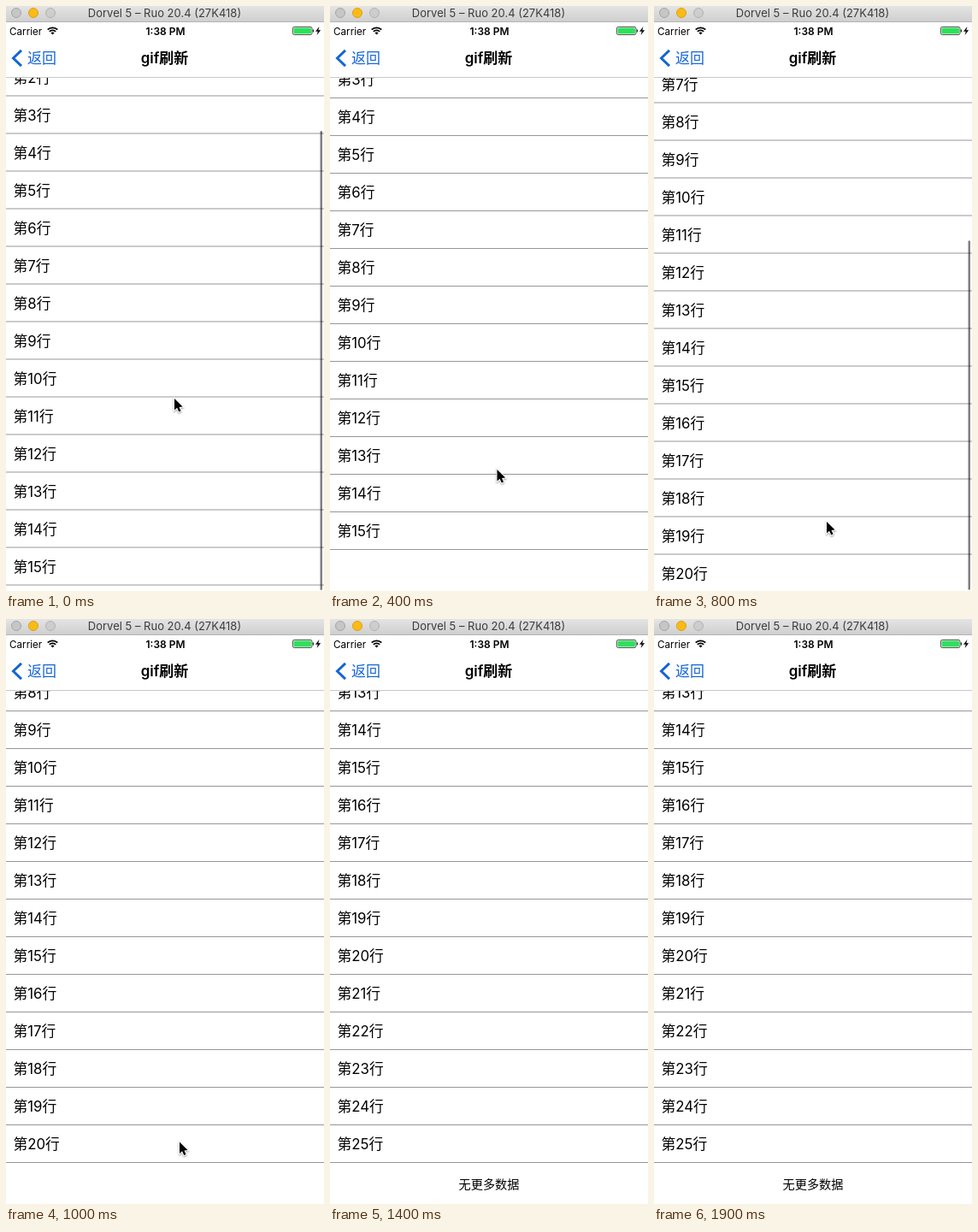
These frames come from a looping animation (372x684 px, 2000 ms). An HTML page with a canvas:

```html
<!DOCTYPE html>
<html lang="zh">
<head>
<meta charset="utf-8">
<title>List refresh</title>
<style>
html, body { margin: 0; width: 100%; height: 100%; overflow: hidden; background: #fff; }
canvas { display: block; }
</style>
</head>
<body>
<canvas id="stage" width="372" height="684"></canvas>
<script>
const W = 372, H = 684, LOOP = 2000, STEP = 100;
const TOP = 83, VIEW = H - TOP, ROW = 44;
const FONT = 'Inter, "Noto Sans CJK SC", "Noto Sans CJK", sans-serif';
const BLUE = '#1566d6';
const ctx = document.getElementById('stage').getContext('2d');

// Keys: time, then values
const scrollKeys = [[0, 66.5], [200, 58], [400, 108], [600, 108], [800, 278.5], [1000, 328], [1200, 328], [1400, 548]];
const pointerKeys = [[0, 197, 459], [200, 198, 547], [600, 193, 537], [800, 202, 603], [1200, 204, 620], [1400, 200, 560]];

function at(keys, t, col = 1) {
  const i = keys.findIndex(k => k[0] > t);
  if (i < 0) return keys[keys.length - 1][col];
  const a = keys[i - 1], b = keys[i];
  return a[col] + (b[col] - a[col]) * (t - a[0]) / (b[0] - a[0]);
}

function text(str, x, y, size, { weight = 400, color = '#000', align = 'left' } = {}) {
  ctx.font = `${weight} ${size}px ${FONT}`;
  ctx.fillStyle = color;
  ctx.textAlign = align;
  ctx.fillText(str, x, y);
}

function box(x, y, w, h, color) {
  ctx.fillStyle = color;
  ctx.fillRect(x, y, w, h);
}

function roundBox(x, y, w, h, r) {
  ctx.beginPath();
  ctx.roundRect(x, y, w, h, r);
}

function poly(points) {
  ctx.beginPath();
  points.forEach(([x, y]) => ctx.lineTo(x, y));
}

function drawList(scroll, rows, ended) {
  for (let n = 1; n <= rows; n++) {
    const y = TOP + ROW * n - scroll;
    if (y < TOP || y > H + ROW) continue;
    text(`第${n}行`, 8.5, y - 15, 16.8);
    box(0, y, W, 1, '#979797');
  }
  if (ended) text('无更多数据', 186, TOP + ROW * rows - scroll + 31, 14.2, { align: 'center' });
}

function drawScrollbar(scroll, rows) {
  const content = rows * ROW, track = 598;
  const over = Math.max(0, scroll - (content - VIEW));
  const y = 85 + (scroll - over) / content * track + over;
  const len = track * VIEW / content - over;
  ctx.fillStyle = 'rgba(0,0,0,.5)';
  roundBox(367.5, y, 2.5, Math.min(len, 683 - y), 1.25);
  ctx.fill();
}

function drawWindowBar() {
  const g = ctx.createLinearGradient(0, 0, 0, 18);
  g.addColorStop(0, '#e4e4e4');
  g.addColorStop(1, '#cfcfcf');
  box(0, 0, W, 18, g);
  box(0, 18, W, 1, '#b4b4b4');
  [['#c6c6c6', '#a5a5a5'], ['#f9bb18', '#dfa012'], ['#cdcdcd', '#b3b3b3']].forEach(([fill, edge], i) => {
    ctx.beginPath();
    ctx.arc(12 + 20 * i, 8, 5.5, 0, 7);
    ctx.fillStyle = fill;
    ctx.fill();
    ctx.strokeStyle = edge;
    ctx.lineWidth = 1;
    ctx.stroke();
  });
  text('Dorvel 5 – Ruo 20.4 (27K418)', 185.5, 13, 13, { color: '#3c3c3c', align: 'center' });
}

function drawWifi() {
  const x = 54.5, y = 33.5;
  ctx.strokeStyle = ctx.fillStyle = '#000';
  ctx.lineWidth = 1.8;
  for (const r of [5.2, 8.2]) {
    ctx.beginPath();
    ctx.arc(x, y, r, -Math.PI * 0.75, -Math.PI * 0.25);
    ctx.stroke();
  }
  ctx.beginPath();
  ctx.moveTo(x, y);
  ctx.arc(x, y, 2.9, -Math.PI * 0.75, -Math.PI * 0.25);
  ctx.fill();
}

function drawBattery() {
  ctx.strokeStyle = '#222';
  ctx.lineWidth = 0.8;
  roundBox(335.4, 24.4, 22.6, 9.2, 2);
  ctx.stroke();
  ctx.fillStyle = '#2ee05c';
  roundBox(336.5, 25.5, 20.4, 7, 1);
  ctx.fill();
  box(358.8, 27.5, 1.2, 3, '#222');
  ctx.fillStyle = '#000';
  poly([[366.5, 24], [362, 29.7], [364.8, 29.7], [363.6, 34], [368.2, 28.2], [365.3, 28.2]]);
  ctx.fill();
}

function drawHeader() {
  box(0, 0, W, TOP, '#fff');
  box(0, TOP, W, 1, '#c9c9c9');
  drawWindowBar();
  text('Carrier', 4, 33.5, 11.7);
  drawWifi();
  text('1:38 PM', 186.5, 33.5, 12, { weight: 600, align: 'center' });
  drawBattery();
  ctx.strokeStyle = BLUE;
  ctx.lineWidth = 3;
  poly([[18, 51.8], [8.5, 61], [18, 70.2]]);
  ctx.stroke();
  text('返回', 25, 67, 17, { color: BLUE });
  text('gif刷新', 185.5, 67, 17, { weight: 600, align: 'center' });
}

function drawPointer(x, y) {
  ctx.save();
  ctx.translate(x, y);
  poly([[0, 0], [0, 13.5], [3.1, 10.7], [5.3, 15.6], [7.6, 14.6], [5.5, 9.9], [9.6, 9.6]]);
  ctx.closePath();
  ctx.shadowColor = 'rgba(0,0,0,.4)';
  ctx.shadowBlur = 2;
  ctx.shadowOffsetY = 1;
  ctx.strokeStyle = '#fff';
  ctx.lineWidth = 2;
  ctx.stroke();
  ctx.shadowColor = 'transparent';
  ctx.fillStyle = '#000';
  ctx.fill();
  ctx.restore();
}

function draw(t) {
  const scroll = at(scrollKeys, t);
  const rows = t < 600 ? 15 : t < 1200 ? 20 : 25;
  const moving = t < 400 || (t >= 700 && t < 1000) || t === 1300;
  // The next batch is already in place when the list settles
  box(0, 0, W, H, '#fff');
  drawList(scroll, rows, t >= 1400);
  if (moving) drawScrollbar(scroll, rows);
  drawHeader();
  if (t < 1400) drawPointer(at(pointerKeys, t, 1), at(pointerKeys, t, 2));
}

const start = performance.now();
function tick() {
  const t = (performance.now() - start) % LOOP;
  draw(Math.floor(t / STEP) * STEP);
  requestAnimationFrame(tick);
}
tick();
</script>
</body>
</html>
```
